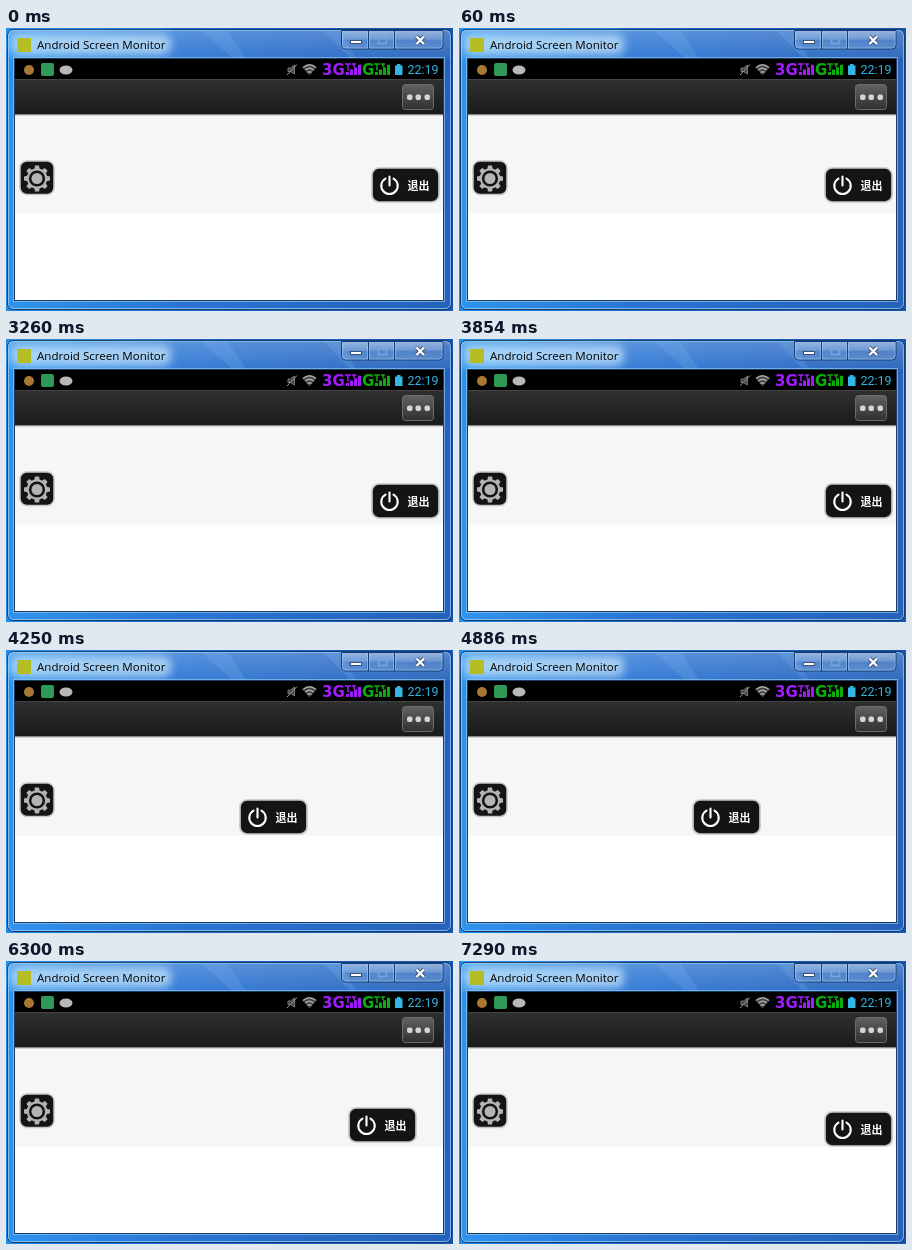
An HTML page for the animation above (8000 ms loop, 447 by 283 pixels).

```html
<!DOCTYPE html>
<html lang="en">
<head>
<meta charset="utf-8">
<title>Screen monitor</title>
<style>
  html, body { margin: 0; width: 100%; height: 100%; overflow: hidden; background: #1565b4; }
  svg { display: block; width: 447px; height: 283px; }
  .title { font: 11.55px "Open Sans", sans-serif; }
  .clock { font: 12.5px Roboto, sans-serif; fill: #33b5e5; }
  .net { font: bold 15px "DejaVu Sans", sans-serif; }
  .label { font: bold 11px "Noto Sans CJK SC", "Noto Sans CJK", sans-serif; fill: #fff; }
</style>
</head>
<body>
<svg viewBox="0 0 447 283" xmlns="http://www.w3.org/2000/svg">
  <defs>
    <linearGradient id="desk" gradientUnits="userSpaceOnUse" x1="0" y1="0" x2="447" y2="0">
      <stop offset="0" stop-color="#1f8cec"/>
      <stop offset=".4" stop-color="#1a6ad0"/>
      <stop offset="1" stop-color="#1455b4"/>
    </linearGradient>
    <linearGradient id="shine" x2="0" y2="1">
      <stop offset="0" stop-color="#fff" stop-opacity=".22"/>
      <stop offset="1" stop-color="#fff" stop-opacity=".06"/>
    </linearGradient>
    <filter id="soft" x="-20%" y="-100%" width="140%" height="300%">
      <feGaussianBlur stdDeviation="4"/>
    </filter>
    <linearGradient id="control" x2="0" y2="1">
      <stop offset="0" stop-color="#fff" stop-opacity=".38"/>
      <stop offset=".48" stop-color="#fff" stop-opacity=".2"/>
      <stop offset=".5" stop-color="#fff" stop-opacity=".04"/>
      <stop offset="1" stop-color="#fff" stop-opacity=".16"/>
    </linearGradient>
    <linearGradient id="bar" x2="0" y2="1">
      <stop offset="0" stop-color="#303030"/>
      <stop offset="1" stop-color="#1a1a1a"/>
    </linearGradient>
    <linearGradient id="more" x2="0" y2="1">
      <stop offset="0" stop-color="#626262"/>
      <stop offset="1" stop-color="#303030"/>
    </linearGradient>
  </defs>

  <!-- Window frame -->
  <rect width="447" height="283" fill="url(#desk)"/>
  <rect x="1.5" y="1.5" width="444" height="280" rx="6" fill="#fff" fill-opacity=".07" stroke="#123a6c"/>
  <rect x="2.5" y="2.5" width="442" height="278" rx="5" fill="none" stroke="#9cd0f8" stroke-opacity=".75"/>
  <rect x="3" y="3" width="441" height="27" fill="url(#shine)"/>
  <path d="M196 3H222L240 30H226ZM318 3H334L350 30H344Z" fill="#8cc4f4" opacity=".18"/>
  <rect x="5" y="6" width="160" height="21" rx="8" fill="#c8e6fb" opacity=".72" filter="url(#soft)"/>
  <rect x="11" y="10" width="14" height="14" fill="#b4bd24"/>
  <text class="title" x="31" y="20.5" fill="#000">Android Screen Monitor</text>

  <path d="M335.5 2.5V17q0 4 4 4H433q4 0 4-4V2.5Z" fill="url(#control)" stroke="#163f78"/>
  <path d="M362.5 3V21M388.5 3V21" stroke="#163f78"/>
  <path d="M336.5 3V17q0 3 3 3H361.5V3M363.5 3V20H387.5V3M389.5 3V20H433q3 0 3-3V3" fill="none" stroke="#a8d0f4" stroke-opacity=".5"/>
  <rect x="344.5" y="12.5" width="11" height="3" fill="#fff" stroke="#3c5474"/>
  <rect x="372.5" y="9.5" width="8" height="6" fill="none" stroke="#74a8dc" stroke-width="1.5"/>
  <g fill="none">
    <path d="M410.500 8.500L418 16M418 8.500L410.500 16" stroke="#3c5474" stroke-width="4"/>
    <path d="M410.500 8.500L418 16M418 8.500L410.500 16" stroke="#fff" stroke-width="2.300"/>
  </g>

  <!-- Device screen -->
  <rect x="7.500" y="29.500" width="431" height="244" fill="none" stroke="#8cc6f6" stroke-opacity=".7"/>
  <rect x="8.500" y="30.500" width="429" height="242" fill="#fff" stroke="#1c3c62"/>
  <rect x="9" y="31" width="428" height="21" fill="#000"/>
  <rect x="9" y="88" width="428" height="97.500" fill="#f6f6f6"/>
  <rect x="9" y="51" width="428" height="36" fill="url(#bar)"/>
  <path d="M9 51.500H437" stroke="#444"/>
  <path d="M9 86.500H437" stroke="#8e8688"/>
  <path d="M9 87.500H437" stroke="#d9d2d3"/>

  <!-- Status icons -->
  <circle cx="23" cy="42" r="5" fill="#a87832"/>
  <rect x="35" y="35" width="13" height="13" rx="2" fill="#2f9a58"/>
  <ellipse cx="60" cy="42" rx="6.500" ry="4.500" fill="#b8b8b8"/>
  <g fill="none" stroke="#777">
    <path d="M282 40H284.500L288.500 37V46L284.500 43.500H282Z" fill="#444"/>
    <path d="M281 47L291 36.500" stroke="#999"/>
  </g>
  <path d="M296.500 39.500Q303.500 33.500 310.500 39.500L303.500 47.500Z" fill="#444"/>
  <path d="M297 39.500Q303.500 34 310 39.500M299.300 42Q303.500 38.500 307.700 42M301.500 44.500Q303.500 43 305.500 44.500" fill="none" stroke="#aaa" stroke-width="1.600"/>
  <text class="net" x="316" y="47.300" fill="#a01cff">3G</text>
  <text class="net" x="356" y="47.300" fill="#0cac0c">G</text>
  <g id="signals"></g>
  <path d="M389 37.500H391V36H394.500V37.500H396.500V47H389Z" fill="#33b5e5"/>
  <text class="clock" x="401.500" y="46">22:19</text>

  <!-- Overflow button -->
  <rect x="396.500" y="56.500" width="31" height="25" rx="3" fill="url(#more)" stroke="#6c6c6c"/>
  <g fill="#d6d6d6">
    <rect x="401" y="66.500" width="5.500" height="5.500" rx="2"/>
    <rect x="409.500" y="66.500" width="5.500" height="5.500" rx="2"/>
    <rect x="418.500" y="66.500" width="5.500" height="5.500" rx="2"/>
  </g>

  <!-- Settings button -->
  <rect x="14" y="133" width="34" height="33.500" rx="7" fill="#141414" stroke="#c6c6c6" stroke-width="1.500"/>
  <g transform="translate(31 150.500)" fill="#b4b4b4">
    <g id="teeth"></g>
    <circle r="9.200" fill="none" stroke="#b4b4b4" stroke-width="2.200"/>
    <circle r="5.500"/>
  </g>

  <!-- Floating exit button -->
  <g id="exit">
    <rect x="1" y="1" width="67" height="34" rx="7" fill="#141414" stroke="#c6c6c6" stroke-width="1.700"/>
    <path d="M14.500 11.600A8.200 8.200 0 1 0 22.500 11.600M18.500 9.500V18.500" fill="none" stroke="#fff" stroke-width="2.100" stroke-linecap="round"/>
    <text class="label" x="36.500" y="22.500">退出</text>
  </g>
</svg>
<script>
const LOOP = 8000;
// Each stop: start time, x, y
const stops = [
  [0, 365, 139],
  [3260, 365, 144],
  [4250, 233, 149],
  [5310, 365, 142],
  [6300, 342, 146],
  [7290, 365, 150]
];
const byId = id => document.getElementById(id);
const exit = byId("exit");

function signal(x, color) {
  let bars = "";
  for (let i = 0; i < 4; i++) {
    const h = 3 + i * 2.4;
    bars += `M${x + 1 + i * 4} 47v${-h}h3v${h}z`;
  }
  return `<path d="${bars}" fill="${color}"/>` +
    `<path d="M${x} 36h6m-3 0v6.500M${x + 7} 36h4m-2 0v3" stroke="${color}" stroke-width="1.500" fill="none"/>`;
}

byId("signals").innerHTML = signal(339, "#a01cff") + signal(368, "#0cac0c");
byId("teeth").innerHTML = Array.from({ length: 8 }, (_, i) =>
  `<path d="M-2.800 -9L-2 -13H2L2.800 -9Z" transform="rotate(${i * 45})"/>`).join("");

function draw(time) {
  const [, x, y] = stops.findLast(stop => stop[0] <= time);
  exit.setAttribute("transform", `translate(${x} ${y})`);
}

const start = performance.now();
function tick() {
  draw((performance.now() - start) % LOOP);
  requestAnimationFrame(tick);
}
tick();
</script>
</body>
</html>
```
